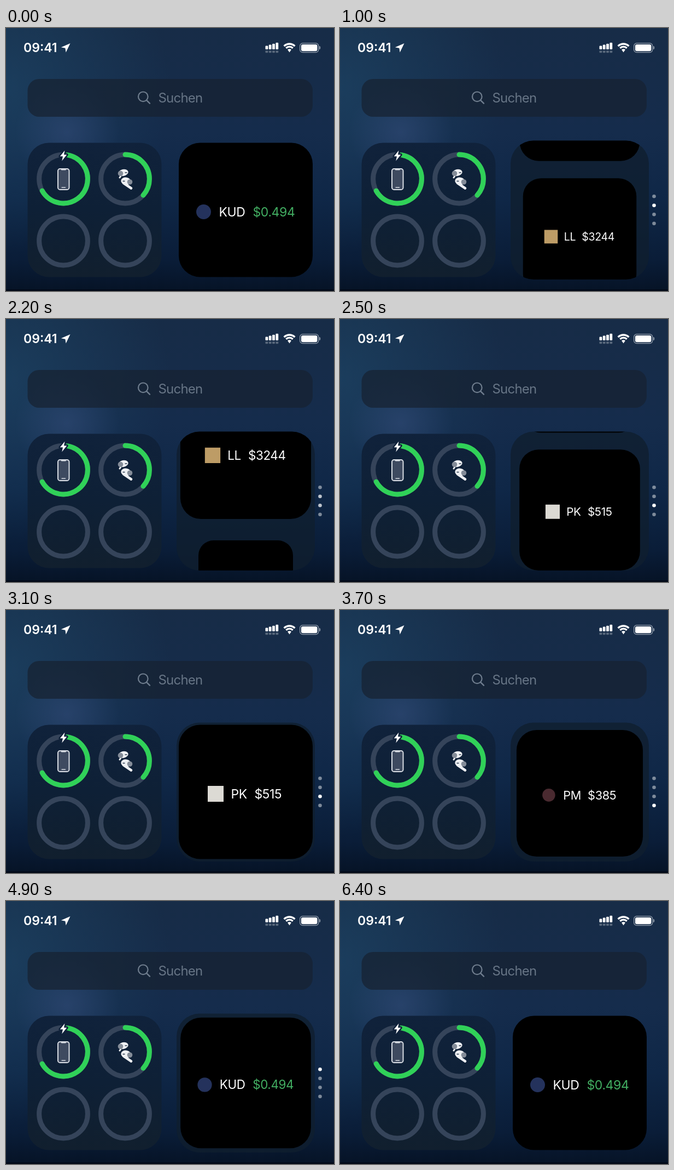
An HTML page with a canvas for the animation above (6.5 s loop, 600 by 480 pixels).

```html
<!DOCTYPE html>
<html lang="de">
<head>
<meta charset="utf-8">
<title>Widget-Stapel</title>
<style>
  html, body { margin: 0; width: 100%; height: 100%; overflow: hidden; background: #0c2038; }
  canvas { display: block; }
</style>
</head>
<body>
<canvas id="stage" width="600" height="480"></canvas>
<script>
const ctx = document.getElementById('stage').getContext('2d');
const LOOP = 6500, STEP = 100;
const FONT = 'Inter, Roboto, sans-serif';
const TAU = Math.PI * 2;

const CARD = { x: 438.5, y: 332, size: 245, r: 39 };
const SWIPES = [700, 2100, 3200, 4300];
const PAGES = [
  { label: 'KUD', lx: 389.5, price: '$0.494', px: 451.5, tint: '#42ae62',
    icon: { x: 361.5, y: 335.5, r: 13.5, color: '#24325c' } },
  { label: 'LL', lx: 404.5, price: '$3244', px: 443, tint: '#fff',
    icon: { x: 376.5, y: 335.5, r: 14.5, color: '#bd9c66', square: true } },
  { label: 'PK', lx: 411.5, price: '$515', px: 454.5, tint: '#fff',
    icon: { x: 383.5, y: 335.5, r: 14.5, color: '#dcdad4', square: true } },
  { label: 'PM', lx: 406.5, price: '$385', px: 454, tint: '#fff',
    icon: { x: 378.5, y: 335.5, r: 12.5, color: '#4a2a30' } }
];

const clamp = v => Math.max(0, Math.min(1, v));

function box(x, y, w, h, r, fill) {
  ctx.beginPath();
  ctx.roundRect(x, y, w, h, r);
  if (fill) { ctx.fillStyle = fill; ctx.fill(); }
}

function disc(x, y, r, fill, ry = r, turn = 0) {
  ctx.beginPath();
  ctx.ellipse(x, y, r, ry, turn, 0, TAU);
  ctx.fillStyle = fill;
  ctx.fill();
}

function shape(points, fill) {
  ctx.beginPath();
  points.forEach(([x, y]) => ctx.lineTo(x, y));
  ctx.closePath();
  ctx.fillStyle = fill;
  ctx.fill();
}

function line(x1, y1, x2, y2, width, color) {
  ctx.beginPath();
  ctx.moveTo(x1, y1);
  ctx.lineTo(x2, y2);
  ctx.lineWidth = width;
  ctx.lineCap = 'round';
  ctx.strokeStyle = color;
  ctx.stroke();
}

// Angles in degrees, clockwise from the top.
function arc(x, y, r, from, to, width, color, cap = 'round') {
  ctx.beginPath();
  ctx.arc(x, y, r, (from - 90) / 360 * TAU, (to - 90) / 360 * TAU);
  ctx.lineWidth = width;
  ctx.lineCap = cap;
  ctx.strokeStyle = color;
  ctx.stroke();
}

function text(str, x, y, size, color, weight = 400, spacing = -0.4) {
  ctx.font = `${weight} ${size}px ${FONT}`;
  ctx.letterSpacing = spacing + 'px';
  ctx.fillStyle = color;
  ctx.fillText(str, x, y);
}

function ramp(x1, y1, x2, y2, ...stops) {
  const g = ctx.createLinearGradient(x1, y1, x2, y2);
  stops.forEach(([at, color]) => g.addColorStop(at, color));
  return g;
}

function glow(x, y, r, rgb, alpha) {
  const g = ctx.createRadialGradient(x, y, 0, x, y, r);
  g.addColorStop(0, `rgba(${rgb},${alpha})`);
  g.addColorStop(1, `rgba(${rgb},0)`);
  ctx.fillStyle = g;
  ctx.fillRect(0, 0, 600, 480);
}

function wallpaper() {
  ctx.fillStyle = ramp(0, 0, 0, 480,
    [0, '#172c47'], [0.4, '#152c4c'], [0.65, '#0f2747'], [0.88, '#0a1d38'], [1, '#061326']);
  ctx.fillRect(0, 0, 600, 480);
  glow(0, 110, 300, '30,72,105', 0.6);
  glow(112, 190, 95, '52,76,122', 0.55);
  ctx.fillStyle = 'rgba(0,4,14,0.6)';
  ctx.fillRect(0, 477, 600, 3);
}

function statusBar() {
  text('09:41', 32, 44.3, 23, '#fff', 600, 0);
  shape([[117.5, 28], [100.8, 35.3], [108.4, 36.8], [109.6, 44.6]], '#fff');
  for (let i = 0; i < 4; i++) {
    const x = 474.5 + i * 6.3, h = 6.5 + i * 1.9;
    box(x, 39 - h, 4.8, h, 1.2, '#fff');
    box(x, 41.3, 4.8, 4, 1, '#58687c');
  }
  arc(518.5, 43, 14, -45, 45, 3.4, '#fff', 'butt');
  arc(518.5, 43, 8.8, -45, 45, 3.3, '#fff', 'butt');
  ctx.beginPath();
  ctx.moveTo(518.5, 44.5);
  ctx.arc(518.5, 43, 4.8, -TAU * 3 / 8, -TAU / 8);
  ctx.closePath();
  ctx.fillStyle = '#fff';
  ctx.fill();
  box(537.7, 27.7, 34, 16.8, 5);
  ctx.lineWidth = 1.4;
  ctx.strokeStyle = '#8894a4';
  ctx.stroke();
  box(540, 30, 29.4, 12.2, 3, '#fff');
  box(573, 33, 2.2, 6, [0, 2, 2, 0], '#8894a4');
}

function searchBar() {
  box(39.5, 93, 521.5, 69, 21, 'rgba(23,34,49,0.72)');
  arc(250.8, 125.3, 8.8, 0, 360, 2.2, '#6f7d8e');
  line(257.2, 131.8, 263, 137.6, 2.4, '#6f7d8e');
  text('Suchen', 278.5, 136.3, 24, '#677586', 400, -0.8);
}

function phone() {
  box(95, 257, 20.5, 38, 3.8, '#3e4a60');
  ctx.lineWidth = 2;
  ctx.strokeStyle = '#d9dde4';
  ctx.stroke();
  box(100.5, 256.5, 9.5, 3, [0, 0, 1.5, 1.5], '#d9dde4');
  line(102, 291, 108.5, 291, 1.4, '#d9dde4');
}

function earbuds() {
  const white = '#eef0f3', grey = '#848c98', dark = '#27364b';
  line(210, 270, 208, 273, 3, white);
  disc(214.5, 264, 9.2, white, 6, -0.2);
  disc(209.5, 265.5, 4.8, grey);
  line(218, 264, 221, 264, 1.3, dark);
  line(215, 283, 229, 292.5, 4.6, white);
  disc(219.5, 279.5, 9.2, white, 6.8, 0.15);
  disc(226.5, 281, 4.8, grey);
  line(214, 279.5, 217, 279.5, 1.3, dark);
}

function batteries() {
  const track = '#35445a', green = '#30d158';
  box(39.5, 209.5, 245, 245, CARD.r, ramp(0, 209, 0, 455, [0, '#10223b'], [0.5, '#0e2036'], [1, '#111f2e']));
  for (const y of [275.5, 388.5])
    for (const x of [105, 218]) arc(x, y, 44.4, 0, 360, 9, track);
  arc(105, 275.5, 44.4, 9, 241, 9, green);
  arc(218, 275.5, 44.4, 0, 132, 9, green);

  const bolt = [[107.5, 223.5], [98.8, 234.3], [104, 234.3], [102.3, 242.5], [111.3, 231.2], [106, 231.2]];
  shape(bolt, '#fff');
  ctx.lineWidth = 5;
  ctx.lineJoin = 'round';
  ctx.strokeStyle = '#10223b';
  ctx.stroke();
  shape(bolt, '#fff');

  phone();
  earbuds();
}

function card(page, shift, scale) {
  const { icon } = page, half = CARD.size / 2;
  ctx.save();
  ctx.translate(CARD.x, CARD.y + shift);
  ctx.scale(scale, scale);
  ctx.translate(-CARD.x, -CARD.y);
  box(CARD.x - half, CARD.y - half, CARD.size, CARD.size, CARD.r, '#000');
  if (icon.square) box(icon.x - icon.r, icon.y - icon.r, icon.r * 2, icon.r * 2, 0, icon.color);
  else disc(icon.x, icon.y, icon.r, icon.color);
  text(page.label, page.lx, 343.6, 23, '#fff');
  text(page.price, page.px, 343.6, 23, page.tint);
  ctx.restore();
}

function stack(t) {
  const k = SWIPES.filter(s => t >= s).length - 1;
  const from = Math.max(k, 0), to = (k + 1) % 4;
  const age = k < 0 ? LOOP : t - SWIPES[k];
  const move = 1 - (1 - clamp(age / 580)) ** 2.3;
  const u = clamp(age / 800);
  const shown = clamp((t - 700) / 250) * clamp((5850 - t) / 500);

  ctx.save();
  box(312, 205.5, 253, 253.5, CARD.r + 3);
  ctx.fillStyle = `rgba(15,31,47,${0.8 * shown})`;
  ctx.fill();
  ctx.clip();
  if (move < 1) card(PAGES[from], -CARD.size * move, 1 - 0.381 * u ** 1.33);
  card(PAGES[to], CARD.size * (1 - move), 1 - 0.381 * (1 - u) ** 1.94);
  ctx.restore();

  const swap = clamp(age / 200);
  for (let i = 0; i < 4; i++) {
    const on = i === to ? swap : i === from ? 1 - swap : 0;
    disc(574.5, 307.3 + i * 16.5, 3.3, `rgba(255,255,255,${(0.47 + 0.53 * on) * shown})`);
  }
}

function frame(now) {
  const t = Math.floor(now % LOOP / STEP) * STEP;
  wallpaper();
  statusBar();
  searchBar();
  batteries();
  stack(t);
  requestAnimationFrame(frame);
}

let start;
requestAnimationFrame(function begin(now) {
  start = now;
  const tick = time => frameAt(time - start);
  frameAt(0);
  function frameAt(ms) {
    const t = Math.floor(ms % LOOP / STEP) * STEP;
    wallpaper();
    statusBar();
    searchBar();
    batteries();
    stack(t);
    requestAnimationFrame(tick);
  }
});
</script>
</body>
</html>
```
